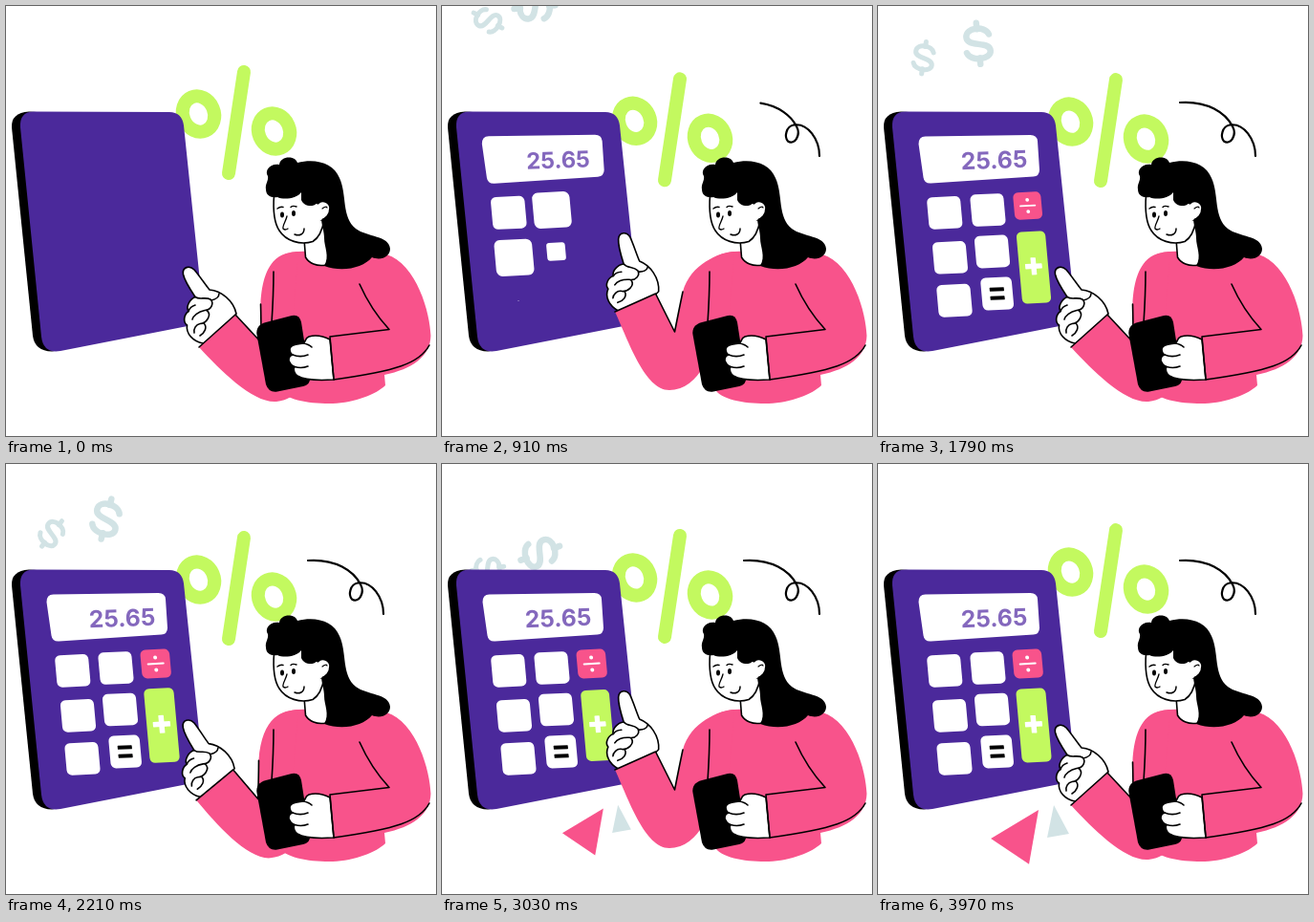
Animation, 450 px wide and 450 px high, one loop 4 s. Source, as an HTML page with a canvas:

```html
<!DOCTYPE html>
<html lang="en">
<head>
<meta charset="utf-8">
<title>Calculator</title>
<style>
html, body { margin: 0; width: 100%; height: 100%; overflow: hidden; background: #fff; }
canvas { display: block; width: 450px; height: 450px; }
</style>
</head>
<body>
<canvas id="stage"></canvas>
<script>
const LOOP = 4000;
const PURPLE = '#4b299b', PINK = '#f8538b', LIME = '#c3f95f', MIST = '#d2e3e5';
const canvas = document.getElementById('stage');
const ctx = canvas.getContext('2d');
const dpr = window.devicePixelRatio || 1;
canvas.width = canvas.height = 450 * dpr;

const lerp = (a, b, k) => a + (b - a) * k;
const clamp = x => Math.max(0, Math.min(1, x));
const smooth = x => { x = clamp(x); return x * x * (3 - 2 * x); };
const bump = (t, a, b, c) => t < b ? smooth((t - a) / (b - a)) : 1 - smooth((t - b) / (c - b));

// damped spring from 0 to 1
const pop = u => u <= 0 ? 0 : 1 - Math.exp(-0.0055 * u) * Math.cos(0.0112 * u);

// piecewise linear track: [time, value] pairs
function track(t, keys) {
  let i = 1;
  while (i < keys.length - 1 && t > keys[i][0]) i++;
  const [a, va] = keys[i - 1], [b, vb] = keys[i];
  return lerp(va, vb, (t - a) / (b - a));
}

function fill(d, color) {
  ctx.fillStyle = color;
  ctx.fill(new Path2D(d));
}

function line(d, width = 1.6, color = '#000') {
  ctx.strokeStyle = color;
  ctx.lineWidth = width;
  ctx.stroke(new Path2D(d));
}

function shape(d, color, width = 1.6) {
  fill(d, color);
  line(d, width);
}

function at(x, y, angle, scale, draw) {
  ctx.save();
  ctx.translate(x, y);
  ctx.rotate(angle * Math.PI / 180);
  ctx.scale(scale, scale);
  draw();
  ctx.restore();
}

function box(x, y, w, h, r, color) {
  ctx.fillStyle = color;
  ctx.beginPath();
  ctx.roundRect(x, y, w, h, r);
  ctx.fill();
}

function percent(t) {
  const dy = 5.2 * (1 - Math.cos(t / LOOP * 6 * Math.PI));
  at(0, dy, 0, 1, () => {
    line('M249 69L233 175', 14, LIME);
    for (const [x, y] of [[201.5, 113], [280.5, 131]]) {
      ctx.beginPath();
      ctx.ellipse(x, y, 16.3, 19, -0.4, 0, 7);
      ctx.stroke();
    }
  });
}

function dollar(x, y, angle, scale) {
  at(x, y, angle, scale, () => {
    line('M11 -8C8 -17 -11 -17 -11 -7C-11 3 11 -2 11 8C11 17 -9 17 -12 8', 6, MIST);
    line('M0 -20V-14M0 14V20', 6, MIST);
  });
}

function dollars(t) {
  dollar(48, 15 + (t - 910) * 0.0445,
    track(t, [[0, -130], [910, -62], [1420, -20], [1790, 8], [2580, 65], [4000, 120]]), 0.84);
  dollar(track(t, [[0, 92], [910, 97], [1420, 105], [2580, 105], [4000, 98]]), 1 + (t - 910) * 0.0435,
    track(t, [[0, -150], [910, -95], [1420, -60], [1790, -6], [2580, 32], [3030, 70], [4000, 110]]), 1.08);
}

function squiggle(t) {
  const u = clamp((t - 550) / 600);
  if (!u) return;
  const len = 165 * (1 - (1 - u) ** 2);
  ctx.setLineDash(u < 1 ? [len, 500] : []);
  line('M395 157C395 140 383 122 368 124.5C360 126 358 137 362 141.5C369 146 376 135 371 126C364 112 345 99 316 101', 2.2);
  ctx.setLineDash([]);
}

function triangles(t) {
  const s = pop(t - 2915);
  if (!s) return;
  at(174, 352, 0, s, () => fill('M-56 40L-6 10L-16 67Z', PINK));
  at(185, 355, 0, s, () => fill('M-1 2L-8 36L15 32Z', MIST));
}

function key(x, y, w, h, s, color, draw) {
  if (s <= 0) return;
  ctx.save();
  ctx.transform(1, -0.05, 0.09, 1, x, y);
  ctx.scale(s, s);
  box(-w / 2, -h / 2, w, h, 5.5, color);
  if (draw) draw();
  ctx.restore();
}

function calculator(t) {
  fill('M24 110.5Q5 112 6 127L28 345Q30 361 48 361.5L57 360L32 111Z', '#000');
  fill('M29 110.5L171 111Q184 111 186 125L206 317Q208 331 195 334L57 361Q39 364 37 346L15 127Q14 110.5 29 110.5Z', PURPLE);

  const screen = pop(t - 130);
  at(105.5, 160.5, 0, screen, () =>
    fill('M-56 -24L54 -25.5Q61 -25.5 61.5 -19L63.5 11Q63.5 17.5 57 18L-50 25Q-57 25.5 -58 19L-63 -16Q-63 -24 -56 -24Z', '#fff'));
  at(121.5, 161, -2, pop(t - 330), () => {
    ctx.fillStyle = '#8468bd';
    ctx.font = '700 24.8px Inter, "Open Sans", sans-serif';
    ctx.textAlign = 'center';
    ctx.textBaseline = 'alphabetic';
    ctx.fillText('25.65', 0, 9);
  });

  const plain = [[69.8, 216.3, 500], [115, 213.5, 570], [75.5, 263.3, 740], [119.5, 257, 836], [80, 308.3, 907]];
  for (const [x, y, start] of plain) key(x, y, 35, 33.5, pop(t - start), '#fff');

  key(124.7, 301, 32.5, 34, pop(t - 1080), '#fff', () => {
    box(-7.5, -6.5, 15, 4, 0.5, '#000');
    box(-7.5, 2.5, 15, 4, 0.5, '#000');
  });
  key(156.7, 209, 30.5, 30, pop(t - 1250), PINK, () => {
    box(-9, -1, 18, 2, 1, '#fff');
    box(-2, -8.5, 4, 4, 2, '#fff');
    box(-2, 4.5, 4, 4, 2, '#fff');
  });
  const press = 1 - 0.15 * bump(t, 2250, 2600, 3250);
  key(163, 273.5, 31, 77, pop(t - 1346) * press, LIME, () => {
    box(-9, -4, 18, 5.5, 0.5, '#fff');
    box(-2.75, -10.5, 5.5, 18.5, 0.5, '#fff');
  });
}

function pointingHand() {
  shape('M206 353C196 351 188 343 189.5 334C185 331 186 323 191 319.5C188 315 192 307 198 304.5' +
    'C193 297 187 288 185.5 281C184 273 192 271 197 276C203 283 208 291 213 297' +
    'C225 298 238 308 241 322L228 346Z', '#fff');
  line('M198 304.5C203 308 208 304 214 307C218 311 215 318 208 318.5C201 320 196 324 195 328');
  line('M191 319.5C192 316 195 314 198 313');
  line('M210 318.5C216 323 210 332 203 332.5C199 333 196 338 197 342');
  line('M207 332C211 336 208 342 203 345');
  line('M215 308C220 307 223 304 223 301');
}

function torso() {
  fill('M306 257C292 258 277 263 275 280L272 350L286 401C291 412 318 416.5 342 416' +
    'C365 415 388 406 397 397L396 386C425 380 444 367 444.5 345' +
    'C444 322 430 270 398 260L350 255Z', PINK);
}

function arm(t) {
  const c = t % 2000;
  const p = c < 1000 ? smooth(c / 900) : 1 - smooth((c - 1060) / 570);
  const pt = (x0, y0, x1, y1) => lerp(x0, x1, p).toFixed(2) + ' ' + lerp(y0, y1, p).toFixed(2) + ' ';
  const a = pt(202, 357, 181, 320), b = pt(240, 323, 223.5, 301);
  const v = pt(267, 352, 243.5, 341), s = pt(266.5, 312, 252, 299);

  ctx.save();
  ctx.translate(lerp(221, 202.5, p), lerp(340, 310.5, p));
  ctx.rotate((16 * p - 7 * bump(c, 250, 580, 880)) * Math.PI / 180);
  ctx.translate(-221, -340);
  pointingHand();
  ctx.restore();

  fill('M306 257C290 258 ' + pt(269, 262, 260, 270) + s + 'L' + v + 'L' + b + 'L' + a +
    'C' + pt(225, 382, 195, 350) + pt(259, 416, 212, 402) + pt(283, 414, 238, 402) +
    'Q' + pt(300, 412, 260, 402) + pt(313, 396, 275, 375) + 'L300 330Z', PINK);
  line('M' + a + 'L' + b + 'L' + v + 'Q' + pt(267, 330, 248, 318) + s);
  line('M280 278Q280 302 278 332');
}

function phone() {
  fill('M272 331L299 324Q307 322 309 331L318 388Q319 396 311 398L284 403.5Q275 405 272 396L262.5 344Q261 334 272 331Z', '#000');
  shape('M339 349C333 346 324 344 317 346C312 348 314 352 311 353C305 354 297 354 297 359' +
    'C297 362 298 364 300 365C296 366 295 370 297 373C298 376 300 377 302 377.5' +
    'C300 380 302 385 305 387C313 392 327 392 343 391Z', '#fff');
  line('M300 365C305 367 311 367 316 365M302 377.5C307 379 311 379 316 377M311 353Q317 354 320 357');
  line('M343 391L339 346L401 338.5Q382 318 370 291');
  line('M443 355C433 374 408 382 343 391');
}

function head(t) {
  shape('M312 244L313.5 263C317 269 325 273 335 271L345 240L330 225Z', '#fff');
  shape('M280.5 198C279.5 211 280 226 286 235C293 246 308 250.5 321 246.5C327 243 331 235 333 224L334 195L300 185Z', '#fff');
  fill('M272 192C271 186 275 183 274 178C270 172 277 164 286 166C287 157 302 156 305 164' +
    'C325 159 343 165 349 180C357 197 351 221 366 233C378 242 401 240 402 254' +
    'C402 262 393 267 383 263C374 274 352 279 333 272C339 262 333 252 333 243' +
    'C333 235 330 229 330 222L325 207C320 211 311 209 309 203L309 195' +
    'C304 202 290 203 284 200C277 201 272 198 272 192Z', '#000');
  shape('M326 208C329 202 338 204 339 211C339 218 335 223 329 224Z', '#fff');
  fill('M324 207L329 208L331 223L327 226L320 220Z', '#fff');
  line('M331 212Q335 209 336 211', 1.2);

  if (t > 1350 && t < 1490) {
    line('M285 214Q288 211 292 213M297 213Q301 210 305 212', 1.4);
  } else {
    ctx.fillStyle = '#000';
    for (const [x, y] of [[289, 218.5], [301, 217]]) {
      ctx.beginPath();
      ctx.ellipse(x, y, 2, 3, 0, 0, 7);
      ctx.fill();
    }
    line('M284 212Q287 209.5 290 210.5M298 210.5Q300 208.5 304 210', 1.4);
  }
  line('M294 220C293 225 289 230 290 233Q292 235 295 233', 1.3);
  line('M302 239C307 241 312 239 312 233', 1.5);
}

function draw(t) {
  ctx.setTransform(dpr, 0, 0, dpr, 0, 0);
  ctx.fillStyle = '#fff';
  ctx.fillRect(0, 0, 450, 450);
  ctx.lineCap = ctx.lineJoin = 'round';
  percent(t);
  dollars(t);
  squiggle(t);
  triangles(t);
  calculator(t);
  torso();
  arm(t);
  phone();
  head(t);
}

function tick() {
  draw(performance.now() % LOOP);
  requestAnimationFrame(tick);
}
tick();
</script>
</body>
</html>
```
